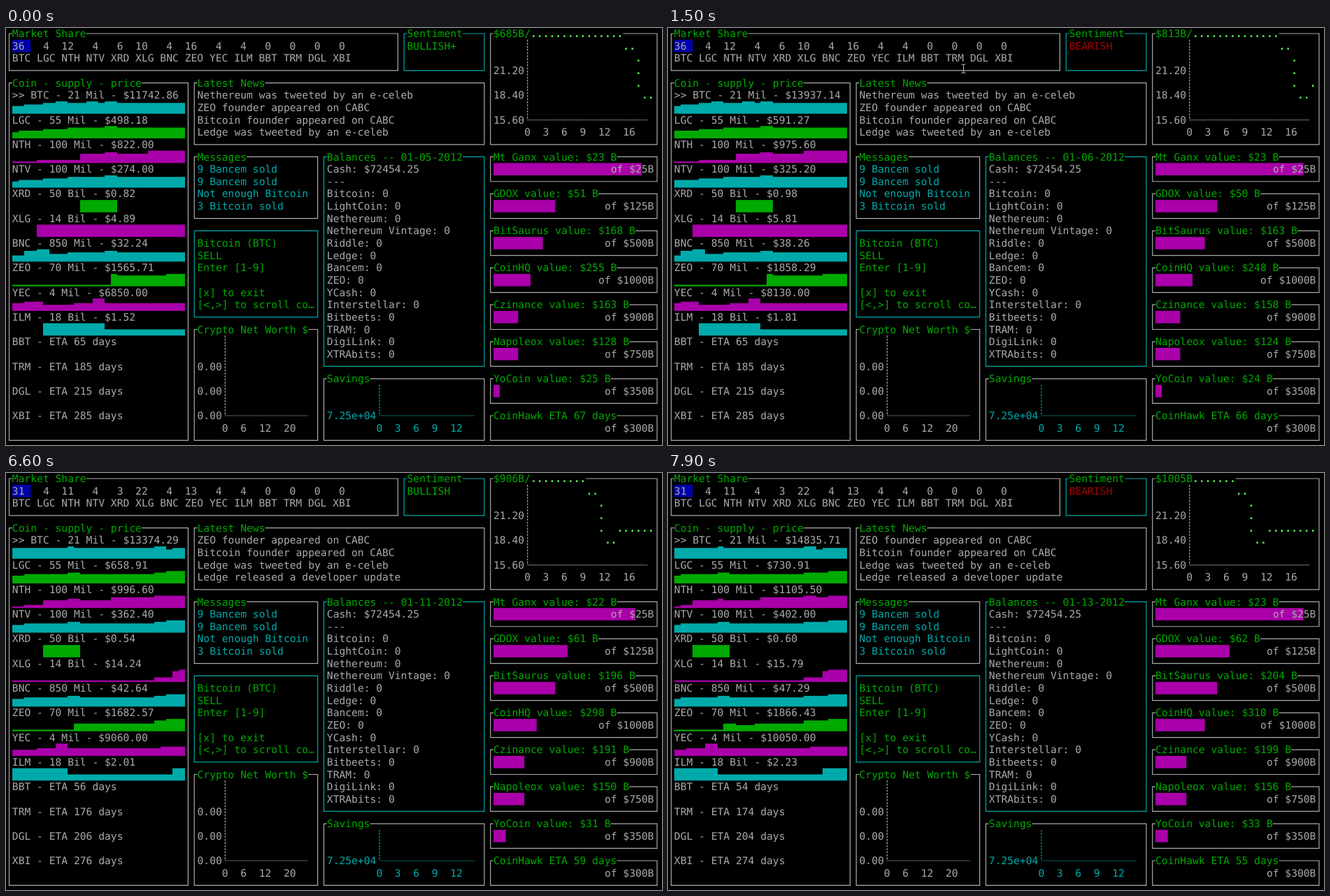
An HTML page with a canvas for the animation above (8 s loop, 938 by 597 pixels).

```html
<!DOCTYPE html>
<html lang="en">
<head>
<meta charset="utf-8">
<title>Coin trading dashboard</title>
<style>
html, body { margin: 0; height: 100%; overflow: hidden; background: #000; }
canvas { display: block; }
</style>
</head>
<body>
<canvas id="stage" width="938" height="597"></canvas>
<script>
const ctx = document.getElementById('stage').getContext('2d');
const W = 8.8235, H = 17.645, TOP = -.8; // terminal cell and offset of the first row
const FONT = '14.656px "DejaVu Sans Mono", monospace';
const GREY = '#aaa', GREEN = '#0a0', CYAN = '#0aa', PINK = '#a0a', RED = '#a00';

// day: days scrolled, cap: market value, eta and hawk: days to the next coin and exchange,
// hq: value that most exchanges follow
const states = [
  { at: 0, day: 0, cap: 685, mood: 'BULLISH+', eta: 65, hawk: 67, ganx: 23.4, gdox: 51, hq: 255.3, yo: 25 },
  { at: 1000, day: 1, cap: 813, mood: 'BEARISH', eta: 65, hawk: 66, ganx: 23.4, gdox: 50, hq: 248.1, yo: 24 },
  { at: 2000, day: 2, cap: 790, mood: 'BULLISH+', eta: 60, hawk: 63, ganx: 23.4, gdox: 57, hq: 278.3, yo: 28 },
  { at: 6600, day: 6, cap: 906, mood: 'BULLISH', eta: 56, hawk: 59, ganx: 22.4, gdox: 61, hq: 298.4, yo: 31 },
  { at: 7300, day: 7, cap: 949, mood: 'BULLISH', eta: 53, hawk: 56, ganx: 23.4, gdox: 63, hq: 316.95, yo: 33 },
  { at: 7900, day: 8, cap: 1005, mood: 'BEARISH', eta: 54, hawk: 55, ganx: 23.4, gdox: 62, hq: 310.8, yo: 33 }
];

// Supply in millions, market share before and after the reshuffle, and the
// weight in the market from a given day on; flat coins ignore the market.
const coins = [
  { name: 'BTC', supply: 21, share: [36, 31], weights: { 0: 1.25, 5: 1.38, 9: 1.22, 14: 1.12, 31: .87 } },
  { name: 'LGC', supply: 55, share: [4, 4], weights: { 0: 1 } },
  { name: 'NTH', supply: 100, share: [12, 11], weights: { 0: .18, 4: .25, 11: .75, 22: 1, 31: .92 } },
  { name: 'NTV', supply: 100, share: [4, 4], weights: { 0: 1 } },
  { name: 'XRD', supply: 50000, share: [6, 3], flat: true, weights: { 0: 0, 11: 1, 17: 0 } },
  { name: 'XLG', supply: 14000, share: [10, 22], flat: true, weights: { 0: 0, 4: 1, 29: 5, 32: 13, 33: 16 } },
  { name: 'BNC', supply: 850, share: [4, 4], weights: { 0: 1, 2: 1.65, 6: 1 } },
  { name: 'ZEO', supply: 70, share: [16, 13], weights: { 0: .08, 16: .75, 25: .82, 29: 1 } },
  { name: 'YEC', supply: 4, share: [4, 4], weights: { 0: 1.5, 5: .9, 13: 1.5, 15: .9 } },
  { name: 'ILM', supply: 18000, share: [4, 4], flat: true, weights: { 0: 0, 5: 2, 15: 1, 32: 2 } }
];
const newCoins = { BBT: 0, TRM: 120, DGL: 150, XBI: 220 };

const news = ['Nethereum was tweeted by an e-celeb', 'ZEO founder appeared on CABC',
  'Bitcoin founder appeared on CABC', 'Ledge was tweeted by an e-celeb', 'Ledge released a developer update'];
const messages = ['9 Bancem sold', '9 Bancem sold', 'Not enough Bitcoin', '3 Bitcoin sold'];
const order = ['Bitcoin (BTC)', 'SELL', 'Enter [1-9]', '', '[x] to exit', '[<,>] to scroll co…'];
const wallet = ['Bitcoin', 'LightCoin', 'Nethereum', 'Nethereum Vintage', 'Riddle', 'Ledge', 'Bancem',
  'ZEO', 'YCash', 'Interstellar', 'Bitbeets', 'TRAM', 'DigiLink', 'XTRAbits'];

// Steady growth with a short spike and a late jump.
function market(day) {
  const spike = 110 * Math.exp(-(((day - 15.4) / 1.1) ** 2));
  const jump = day > 28 ? 85 : 0;
  return 410 + 22 * Math.min(day, 10) + 2 * Math.max(0, day - 10) + spike + jump
    + 17 * Math.max(0, day - 29);
}

function text(s, col, row, color = GREY) {
  ctx.fillStyle = color;
  ctx.fillText(s, col * W, row * H + 13.9);
}

function lines(list, col, row, color) {
  list.forEach((s, i) => text(s, col, row + i, color));
}

function fill(col, row, cols, color, part = 1) {
  ctx.fillStyle = color;
  ctx.fillRect(col * W, (row + 1 - part) * H, cols * W, part * H);
}

function stroke(points, color, dash = []) {
  ctx.strokeStyle = color;
  ctx.lineWidth = 1.2;
  ctx.setLineDash(dash);
  ctx.beginPath();
  points.forEach(([x, y]) => ctx.lineTo(x, y));
  ctx.stroke();
}

function box(left, top, right, bottom, title = '', color = GREY) {
  const [x0, x1] = [left, right].map(c => (c + .5) * W + .1);
  const [y0, y1] = [top, bottom].map(r => (r + .5) * H);
  const start = title ? (left + 1 + title.length) * W : x0;
  const end = title ? (left + 1) * W : x0;
  stroke([[start, y0], [x1, y0], [x1, y1], [x0, y1], [x0, y0], [end, y0]], color);
  text(title, left + 1, top, GREEN);
}

// Tick labels start in the axis column, a gap of `step` columns apart.
function axes(col, top, bottom, endCol, labels, color) {
  const x = (col + .5) * W + .1, y = (bottom + .5) * H;
  stroke([[x, top * H], [x, y]], color, [2.8, 1.6]);
  stroke([[x, y], [endCol * W, y]], color, [1.2, 1]);
  text(labels, col, bottom + 1, color);
}

function sparkline({ weights, flat }, row, first, color) {
  const bars = Array.from({ length: 28 }, (_, i) => {
    const day = first + i;
    const weight = weights[Object.keys(weights).findLast(from => from <= day)];
    return flat ? weight : weight * market(day);
  });
  const max = Math.max(...bars);
  bars.forEach((v, i) => {
    const level = v && Math.max(1, Math.round(v / max * 8));
    const x = Math.round((i + 1) * W), end = Math.round((i + 2) * W);
    ctx.fillStyle = color;
    ctx.fillRect(x, (row + 1 - level / 8) * H, end - x, level / 8 * H);
  });
}

function shares(s) {
  box(0, 0, 63, 3, 'Market Share');
  fill(1, 1, 3, '#00a');
  const list = coins.map(c => c.share[s.day < 2 ? 0 : 1]).concat(0, 0, 0, 0);
  text(list.map(v => String(v).padStart(2)).join('  '), 1, 1);
  text([...coins.map(c => c.name), ...Object.keys(newCoins)].join(' '), 1, 2);
  box(64, 0, 77, 3, 'Sentiment', CYAN);
  text(s.mood, 65, 1, s.mood === 'BEARISH' ? RED : GREEN);
}

function coinList(s) {
  box(0, 4, 29, 33, 'Coin - supply - price');
  coins.forEach((coin, i) => {
    const { name, supply, share } = coin, row = 5 + i * 2;
    const amount = supply < 1000 ? supply + ' Mil' : supply / 1000 + ' Bil';
    const price = (s.cap * share[s.day < 6 ? 0 : 1] * 10 / supply).toFixed(2);
    text(`${i ? '' : '>> '}${name} - ${amount} - $${price}`, 1, row);
    sparkline(coin, row + 1, s.day, [CYAN, GREEN, PINK][i % 3]);
  });
  Object.entries(newCoins).forEach(([name, wait], i) =>
    text(`${name} - ETA ${s.eta + wait} days`, 1, 25 + i * 2));
}

function capChart(s) {
  box(78, 0, 105, 9, `$${s.cap}B/`.slice(0, 6));
  ['21.20', '18.40', '15.60'].forEach((label, i) => text(label, 79, 3 + i * 2));
  axes(84, 1, 7, 104, '0  3  6  9  12  16', GREY);
  const dot = (col, row) => {
    if (!row) fill(col, 0, 1, '#000');
    text('.', col, row, '#5f5');
  };
  ctx.font = 'bold ' + FONT;
  for (let col = 85; col < 105; col++) {
    const d = col - 102 + s.day; // columns past the drop
    if (d === 0) [2, 3, 4].forEach(row => dot(col, row));
    else dot(col, d < -2 ? 0 : d < 0 ? 1 : d < 3 ? 5 : 4);
  }
  ctx.font = FONT;
}

function gauge(row, title, max, value = 0) {
  const percent = Math.floor(value / max * 100);
  const label = `of $${max}B`;
  box(78, row, 105, row + 2, title);
  fill(79, row + 1, Math.floor(percent * .26), PINK);
  text(label, 105 - label.length, row + 1);
}

function gauges(s) {
  const exchanges = [['Mt Ganx', 25, s.ganx], ['GDOX', 125, s.gdox], ['BitSaurus', 500, s.hq * .659],
    ['CoinHQ', 1000, s.hq], ['Czinance', 900, s.hq * .6405], ['Napoleox', 750, s.hq * .5035],
    ['YoCoin', 350, s.yo]];
  exchanges.forEach(([name, max, value], i) =>
    gauge(10 + i * 3, `${name} value: $${Math.floor(value)} B`, max, value));
  gauge(31, `CoinHawk ETA ${s.hawk} days`, 300);
}

function panels(s) {
  const first = s.day < 2 ? 0 : 1;
  box(30, 4, 77, 9, 'Latest News');
  lines(news.slice(first, first + 4), 31, 5);
  box(30, 10, 50, 15, 'Messages');
  lines(messages, 31, 11, CYAN);
  box(30, 16, 50, 23, '', CYAN);
  lines(order, 31, 17, GREEN);

  const date = String(5 + s.day).padStart(2, '0');
  box(51, 10, 77, 27, `Balances -- 01-${date}-2012`, CYAN);
  lines(['Cash: $72454.25', '---', ...wallet.map(name => name + ': 0')], 52, 11);

  box(30, 24, 50, 33, 'Crypto Net Worth $');
  lines(['0.00', '', '0.00', '', '0.00'], 31, 27);
  axes(35, 25, 31, 49, '0  6  12  20', GREY);

  box(51, 28, 77, 33, 'Savings');
  text('7.25e+04', 52, 31, CYAN);
  axes(60, 29, 31, 76, '0  3  6  9  12', CYAN);
}

// The text pointer leaves through the top edge, resting on the way.
function pointer(t) {
  if (t < 1000 || t >= 1900) return;
  const step = Math.floor((t - 1000) / 100);
  const moved = step < 5 ? Math.min(step, 3) : step - 1;
  const x = 422.5, y = 127 - moved * 17;
  stroke([[x - 3, y - 6.5], [x, y - 5.5], [x + 3, y - 6.5]], GREY);
  stroke([[x, y - 5.5], [x, y + 5.5]], GREY);
  stroke([[x - 3, y + 6.5], [x, y + 5.5], [x + 3, y + 6.5]], GREY);
}

function draw(now) {
  const t = now % 8000;
  const s = states.findLast(state => state.at <= t);
  ctx.setTransform(1, 0, 0, 1, 0, TOP);
  ctx.fillStyle = '#000';
  ctx.fillRect(0, 0, 938, 600);
  ctx.font = FONT;
  ctx.textRendering = 'geometricPrecision';
  [shares, coinList, capChart, gauges, panels].forEach(part => part(s));
  pointer(t);
  requestAnimationFrame(draw);
}
requestAnimationFrame(draw);
</script>
</body>
</html>
```
